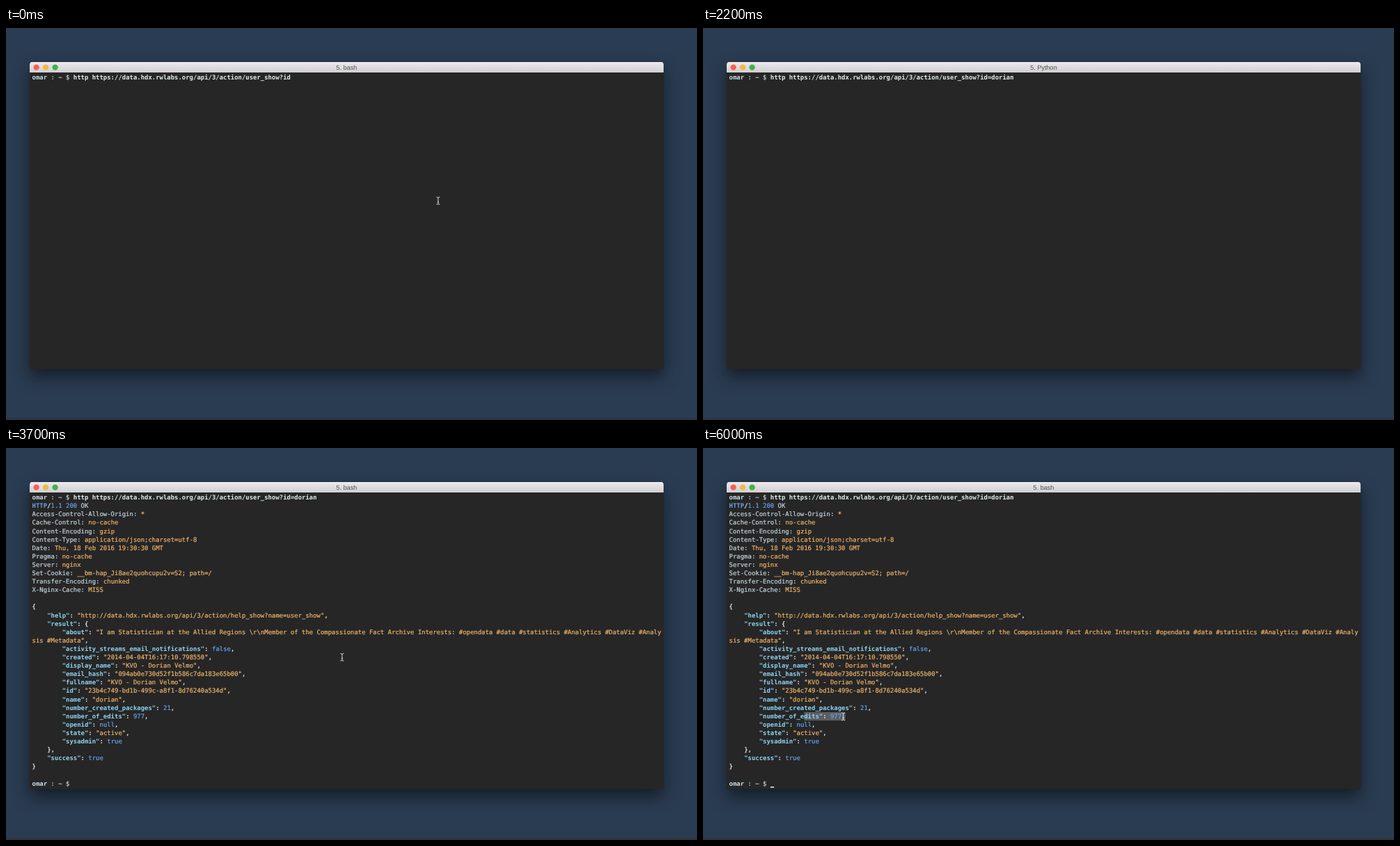
These frames come from a looping animation (993x564 px, 6100 ms). An HTML page:

```html
<!DOCTYPE html>
<html lang="en">
<head>
<meta charset="utf-8">
<title>Terminal request</title>
<style>
  html, body { margin: 0; width: 100%; height: 100%; overflow: hidden; background: #2a3c52; }
  #stage { position: relative; width: 993px; height: 564px; overflow: hidden; background: #2a3c52; }
  #dock { position: absolute; left: 0; right: 0; top: 561px; height: 3px; background: #2c3541; }
  #window { position: absolute; left: 34px; top: 49px; width: 911px; height: 441.5px;
    border-radius: 4px 4px 2px 2px; background: #262626; overflow: hidden; }
  #shadow { position: absolute; left: 34px; top: 49px; width: 911px; height: 441.5px;
    border-radius: 4px; box-shadow: 0 11px 22px rgba(0, 0, 0, .5), 0 0 1px rgba(0, 0, 0, .4); }
  #bar { height: 15px; background: linear-gradient(#ebe9eb, #d1cfd1); box-shadow: inset 0 1px #f4f3f4; }
  svg { position: absolute; left: 0; top: 0; }
  text { text-rendering: geometricPrecision; }
  #lines text { font: 8.943px "DejaVu Sans Mono", "Liberation Mono", monospace;
    stroke: currentColor; stroke-width: .22px; fill: currentColor; }
  #lines text.b { font-weight: bold; stroke-width: 0; }
  #title { font: 9.1px "Liberation Sans", Arial, sans-serif; fill: #505050; text-anchor: middle; }
</style>
</head>
<body>
<div id="stage">
  <div id="dock"></div>
  <div id="shadow"></div>
  <div id="window"><div id="bar"></div></div>
  <svg width="993" height="564" viewBox="0 0 993 564">
    <circle cx="43.6" cy="56.6" r="4.2" fill="#f95f53"/>
    <circle cx="57.1" cy="56.6" r="4.2" fill="#f0b944"/>
    <circle cx="70.6" cy="56.6" r="4.2" fill="#45b048"/>
    <text id="title" x="489.5" y="60"></text>
    <rect id="selection" y="380" height="12.1" fill="#5b5e61"/>
    <g id="lines"></g>
    <rect id="caret" width="5.4" height="1.5" fill="#f2f2f2"/>
    <g id="mouse" fill="none">
      <path id="beam" d="M-2.5-5.3Q0-5.3 0-3.8Q0-5.3 2.5-5.3M0-4V4M-2.5 5.3Q0 5.3 0 3.8Q0 5.3 2.5 5.3M-1.2 1.6H1.2" stroke="#d6d6d6" stroke-width="1"/>
    </g>
  </svg>
</div>
<script>
const LOOP = 6100, STEP = 100;
const LEFT = 37.6, TOP = 74.1, CHAR = 5.384, ROW = 12.1, COLS = 168, LAST = 34;
const ENTER = 1700, REPLY = 2900, DONE = 3000;
const keyTimes = [400, 1100, 1200, 1300, 1400, 1500, 1600];

const color = {
  user: '#cbe0ea', dim: '#c3cbce', cmd: '#e0eee9', blue: '#68a1e8',
  name: '#c2d3dd', value: '#ebb26a', key: '#8fd3f0', plain: '#e4e8e8'
};

const headers = `Access-Control-Allow-Origin: *
Cache-Control: no-cache
Content-Encoding: gzip
Content-Type: application/json;charset=utf-8
Date: Thu, 18 Feb 2016 19:30:30 GMT
Pragma: no-cache
Server: nginx
Set-Cookie: __bm-hap_Ji8ae2quohcupu2v=S2; path=/
Transfer-Encoding: chunked
X-Nginx-Cache: MISS`.split('\n');

const body = String.raw`{
    "help": "http://data.hdx.rwlabs.org/api/3/action/help_show?name=user_show",
    "result": {
        "about": "I am Statistician at the Allied Regions \r\nMember of the Compassionate Fact Archive Interests: #opendata #data #statistics #Analytics #DataViz #Analysis #Metadata",
        "activity_streams_email_notifications": false,
        "created": "2014-04-04T16:17:10.798550",
        "display_name": "KVO - Dorian Velmo",
        "email_hash": "094ab0e730d52f1b586c7da183e65b00",
        "fullname": "KVO - Dorian Velmo",
        "id": "23b4c749-bd1b-499c-a8f1-8d76240a534d",
        "name": "dorian",
        "number_created_packages": 21,
        "number_of_edits": 977,
        "openid": null,
        "state": "active",
        "sysadmin": true
    },
    "success": true
}`;

const $ = id => document.getElementById(id);
const NS = 'http://www.w3.org/2000/svg';
const x = col => LEFT + col * CHAR;
const y = row => TOP + row * ROW;

function group() {
  return $('lines').appendChild(document.createElementNS(NS, 'g'));
}

function put(parent, row, col, str, hue, bold) {
  const el = document.createElementNS(NS, 'text');
  el.setAttribute('x', x(col));
  el.setAttribute('y', y(row));
  el.style.color = color[hue];
  if (bold) el.setAttribute('class', 'b');
  el.textContent = str;
  return parent.appendChild(el);
}

function prompt(parent, row) {
  put(parent, row, 0, 'omar', 'user', true);
  put(parent, row, 5, ': ~ $', 'dim');
}

function printHeaders(parent) {
  put(parent, 1, 0, 'HTTP', 'blue', true);
  put(parent, 1, 4, '/', 'plain');
  put(parent, 1, 5, '1.1 200', 'blue');
  put(parent, 1, 13, 'OK', 'name');
  headers.forEach((line, i) => {
    const cut = line.indexOf(':') + 1;
    put(parent, i + 2, 0, line.slice(0, cut), 'name');
    put(parent, i + 2, cut + 1, line.slice(cut + 1), 'value');
  });
}

function printBody(parent) {
  let row = 13, col = 0;
  const tokens = body.match(/"[^"]*"|\w+|\n| +|[{}:,]/g);
  tokens.forEach((tok, i) => {
    if (tok === '\n') { row++; col = 0; return; }
    if (tok[0] === ' ') { col += tok.length; return; }
    const isKey = tok[0] === '"' && tokens[i + 1] === ':';
    const hue = isKey ? 'key' : tok[0] === '"' ? 'value' : /\w/.test(tok) ? 'blue' : 'plain';
    const bold = isKey || hue === 'plain';
    const room = COLS - col;
    put(parent, row, col, tok.slice(0, room), hue, bold);
    col += tok.length;
    if (tok.length > room) {
      row++;
      put(parent, row, 0, tok.slice(room), hue, bold);
      col = tok.length - room;
    }
  });
}

const start = 'http https://data.hdx.rwlabs.org/api/3/action/user_show?id';
const typed = '=dorian';
const first = group(), reply = group(), next = group();
prompt(first, 0);
const command = put(first, 0, 11, start, 'cmd', true);
printHeaders(reply);
printBody(reply);
prompt(next, LAST);

// time, x, y of the pointer
const path = [
  [3400, 570, 262], [3700, 483, 301], [4300, 205, 366], [4700, 168, 375],
  [5200, 146, 386], [5300, 146, 386], [5800, 201.5, 386.5]
];

function pointer(t) {
  if (t < 400) return [621, 248.5];
  if (t < path[0][0]) return null;
  const i = path.findIndex(p => p[0] > t);
  if (i < 0) return path[path.length - 1].slice(1);
  const [a, b] = [path[i - 1], path[i]];
  const k = (t - a[0]) / (b[0] - a[0]), e = k * k * (3 - 2 * k);
  return [a[1] + (b[1] - a[1]) * e, a[2] + (b[2] - a[2]) * e];
}

const show = (el, on) => { el.style.visibility = on ? 'visible' : 'hidden'; };

function render(t) {
  const keys = keyTimes.filter(k => k <= t).length;
  command.textContent = start + typed.slice(0, keys);
  $('title').textContent = t >= 1900 && t < 3200 ? '5. Python' : '5. bash';
  show(reply, t >= REPLY);
  show(next, t >= DONE);

  const [row, col] = t < ENTER ? [0, 11 + start.length + keys]
    : t < REPLY ? [1, 0] : [LAST, t < DONE ? 0 : 11];
  $('caret').setAttribute('x', x(col));
  $('caret').setAttribute('y', y(row) + 1.7);
  show($('caret'), t >= 400 && (t < ENTER || Math.floor(t / 700) % 2 === 0));

  const at = pointer(t);
  show($('mouse'), at);
  if (at) $('mouse').setAttribute('transform', `translate(${at[0]} ${at[1]})`);

  const dragged = t < 5300 ? 0 : Math.min(11, Math.round((at[0] - x(20)) / CHAR + .6));
  $('selection').setAttribute('x', x(20));
  $('selection').setAttribute('width', dragged * CHAR);
}

const origin = performance.now();
function tick() {
  const t = (performance.now() - origin) % LOOP;
  render(Math.floor(t / STEP) * STEP);
  requestAnimationFrame(tick);
}
tick();
</script>
</body>
</html>
```
